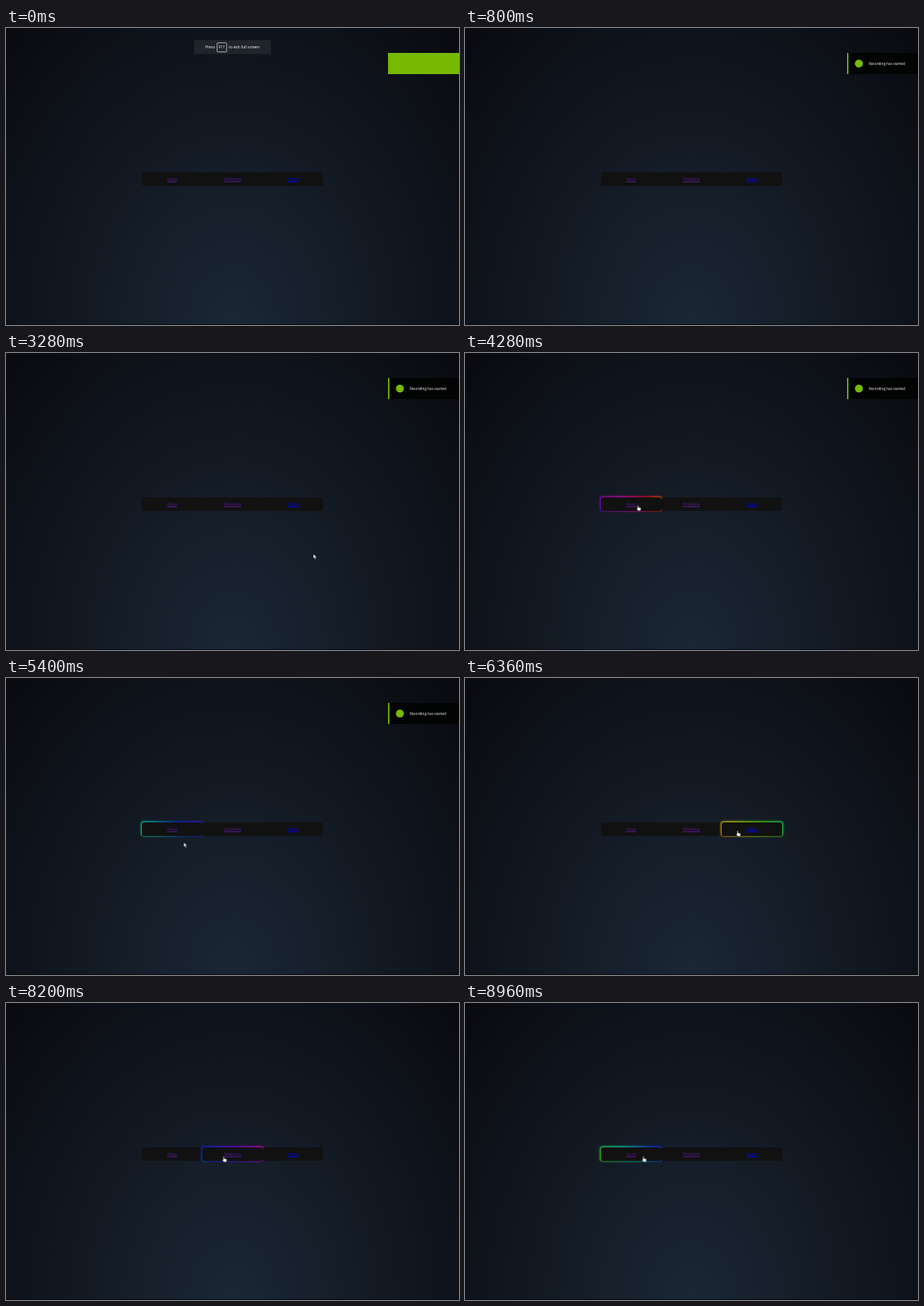
Recreate the animation shown at these times as an HTML page. Size 600x393 px, loop 9000 ms.

```html
<!DOCTYPE html>
<html lang="en">
<head>
<meta charset="utf-8">
<title>Glowing links</title>
<style>
  html, body { margin: 0; width: 100%; height: 100%; overflow: hidden; }
  body {
    position: relative;
    background: radial-gradient(ellipse at bottom, #1b2735 0%, #090a0f 100%);
  }
  body > * { position: absolute; }
  svg { left: 0; top: 0; width: 600px; height: 393px; overflow: hidden; }
  svg text { font-family: "Open Sans", sans-serif; fill: #fff; }

  .edge { left: 0; top: 392px; width: 600px; height: 1px; background: #06080c; }

  /* every animation shares one 9 s loop */
  .bubble, .slab, .panel, .note, .glow, .glow::before, .cursor, .arrow, .hand {
    animation: 9s linear infinite both;
  }

  .bubble { font-size: 5.15px; animation-name: bubble; }
  .bubble rect { fill: #20242b; }
  .bubble .key { fill: none; stroke: #e8e8e8; stroke-width: .7; }
  @keyframes bubble {
    0%, 1% { opacity: 1; }
    7.2%, 100% { opacity: 0; }
  }

  nav { left: 180px; top: 190.5px; display: flex; }
  .btn { position: relative; z-index: 0; width: 80px; height: 18px; }
  .btn a {
    position: relative; display: block;
    font: 5px/18px "Liberation Sans", Arial, sans-serif;
    text-align: center; color: #551a8b; background: #111; border-radius: 3.1px;
    text-decoration: underline; text-decoration-thickness: .35px;
  }
  .btn:last-child a { color: #00e; }
  .glow { position: absolute; inset: -.625px; filter: blur(1.5px); opacity: 0; }
  .glow::before {
    content: ""; position: absolute; inset: 0; border-radius: 3.1px;
    background: linear-gradient(45deg, #ff0000, #ff7300, #fffb00, #48ff00, #00ffd5, #002bff, #7a00ff, #ff00c8, #ff0000);
    background-size: 400%;
    animation-name: hue;
  }
  @keyframes hue {
    from { background-position: 409.9% 0; }
    to { background-position: 49.9% 0; }
  }
  .one .glow { animation-name: one; animation-timing-function: ease; }
  .two .glow { animation-name: two; animation-timing-function: ease; }
  .three .glow { animation-name: three; animation-timing-function: ease; }
  @keyframes one {
    0%, 44% { opacity: 0; }
    47.33%, 59.67% { opacity: 1; }
    63%, 93.33% { opacity: 0; }
    96.67%, 100% { opacity: 1; }
  }
  @keyframes two {
    0%, 85.33% { opacity: 0; }
    88.67%, 93.33% { opacity: 1; }
    96.67%, 100% { opacity: 0; }
  }
  @keyframes three {
    0%, 66.67% { opacity: 0; }
    70%, 85.33% { opacity: 1; }
    88.67%, 100% { opacity: 0; }
  }

  .slab { fill: #76b900; animation-name: slab; }
  .panel { animation-name: panel; }
  .note { font-size: 4.72px; animation-name: note; }
  @keyframes slab {
    0%, 64.2% { transform: translateX(0); animation-timing-function: ease-in; }
    68%, 100% { transform: translateX(95px); }
  }
  @keyframes panel {
    0%, .8% { transform: translateX(93px); animation-timing-function: ease-out; }
    5.2%, 61.2% { transform: translateX(0); animation-timing-function: ease-in; }
    64.2%, 100% { transform: translateX(93px); }
  }
  @keyframes note {
    0%, 4% { opacity: 0; }
    8.4%, 100% { opacity: 1; }
  }

  .cursor { animation-name: move; }
  .cursor path { fill: #fff; stroke: #000; stroke-width: .45; stroke-linejoin: round; }
  .arrow { animation-name: arrow; animation-timing-function: step-end; }
  .hand { animation-name: hand; animation-timing-function: step-end; }
  @keyframes move {
    0%, 18.2% { transform: translate(258px, 396px); }
    24% { transform: translate(263px, 336px); }
    28% { transform: translate(290px, 262px); }
    33% { transform: translate(372px, 232px); }
    38.5% { transform: translate(428px, 286px); }
    41.5% { transform: translate(300px, 252px); }
    44% { transform: translate(238px, 208.5px); }
    45.5% { transform: translate(229px, 202px); }
    47.56% { transform: translate(229px, 201.3px); }
    52% { transform: translate(240px, 201px); }
    58.67% { transform: translate(235px, 203px); }
    60% { transform: translate(235.3px, 217.3px); }
    62.5% { transform: translate(268px, 243px); }
    64.5% { transform: translate(318px, 238px); }
    66.67% { transform: translate(352px, 208.5px); }
    68.5% { transform: translate(362px, 202.5px); }
    70.67% { transform: translate(361px, 202px); }
    75% { transform: translate(378px, 203px); }
    79% { transform: translate(366px, 203px); }
    82.67% { transform: translate(353.5px, 202.3px); }
    85.33% { transform: translate(340px, 203px); }
    88.67% { transform: translate(302px, 203px); }
    91% { transform: translate(290px, 203px); }
    93.33% { transform: translate(260px, 203px); }
    95.5%, 100% { transform: translate(236.3px, 202.8px); }
  }
  @keyframes arrow {
    0% { opacity: 0; }
    18.2% { opacity: 1; }
    44% { opacity: 0; }
    59.4% { opacity: 1; }
    66.67%, 100% { opacity: 0; }
  }
  @keyframes hand {
    0% { opacity: 0; }
    44% { opacity: 1; }
    59.4% { opacity: 0; }
    66.67%, 100% { opacity: 1; }
  }
</style>
</head>
<body>
  <div class="edge"></div>

  <nav>
    <div class="btn one"><div class="glow"></div><a>About</a></div>
    <div class="btn two"><div class="glow"></div><a>Slideshow</a></div>
    <div class="btn three"><div class="glow"></div><a>Studio</a></div>
  </nav>

  <svg viewBox="0 0 600 393">
    <defs>
      <clipPath id="toast"><rect x="506" y="33" width="94" height="28"/></clipPath>
    </defs>

    <g class="bubble">
      <rect x="249.3" y="16" width="101.4" height="18.6"/>
      <rect class="key" x="279.6" y="19.6" width="12.6" height="12" rx="1"/>
      <text x="264" y="27.3">Press</text>
      <text x="285.9" y="27.3" text-anchor="middle">F11</text>
      <text x="295" y="27.3">to exit full screen</text>
    </g>

    <g clip-path="url(#toast)">
      <rect class="slab" x="506" y="33" width="94" height="28"/>
      <g class="panel">
        <rect x="507.8" y="33" width="93" height="28" fill="#020303"/>
        <g class="note">
          <circle cx="521.7" cy="47" r="5.3" fill="#76b900"/>
          <text x="535" y="48.9">Recording has started</text>
        </g>
      </g>
    </g>

    <g class="cursor">
      <path class="arrow" d="M0 0V6.2L1.4 5L2.4 7.2L3.5 6.7L2.5 4.6H4.4Z"/>
      <path class="hand" d="M-.7.6Q0-.5.7.6V2.8L3.5 3.5Q4.2 3.8 4 4.9L3.4 7.5H.3L-2.1 4.8Q-1.9 3.6-.7 4.6Z"/>
    </g>
  </svg>
</body>
</html>
```
